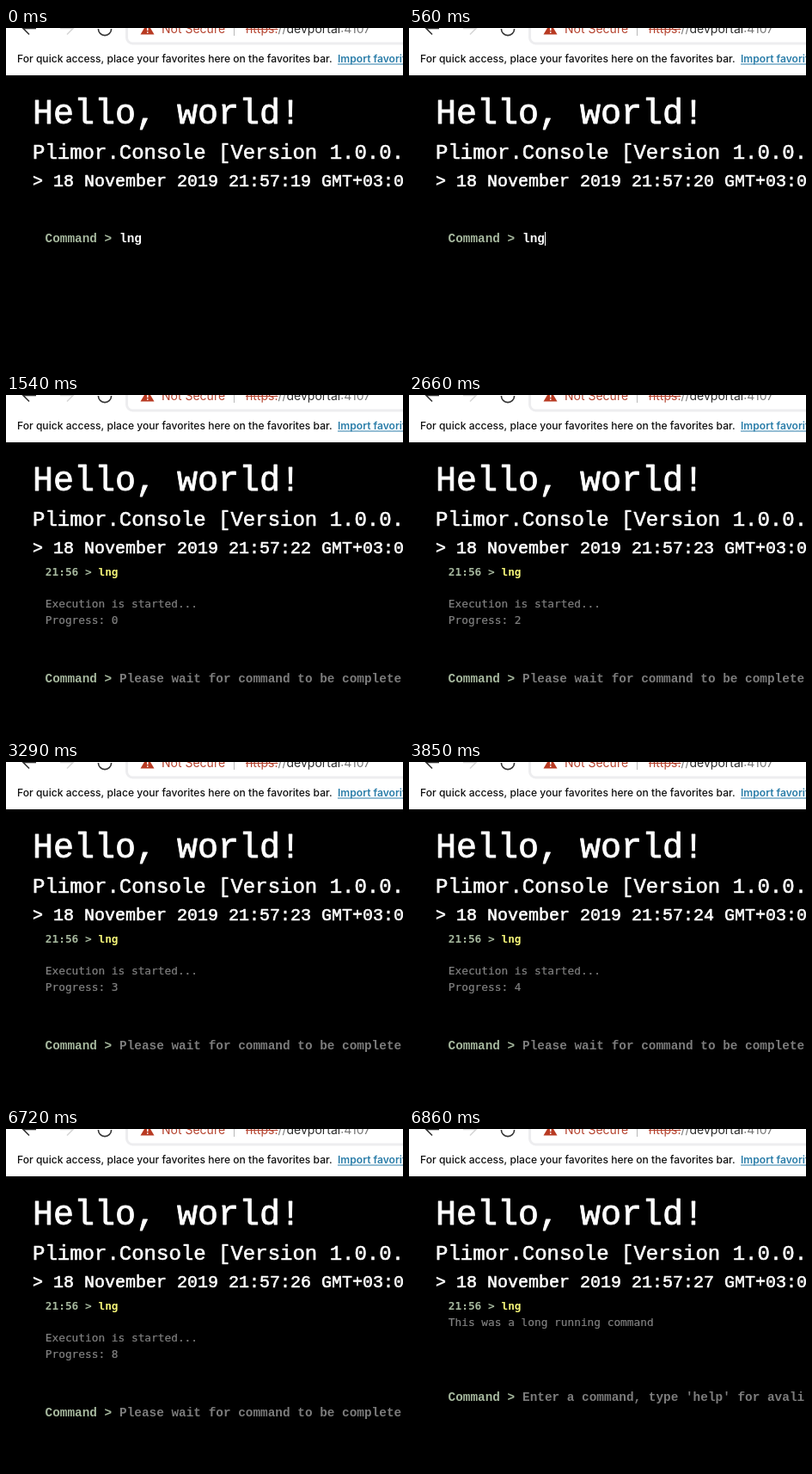
These frames come from a looping animation (462x394 px, 8120 ms). An HTML page with a canvas:

```html
<!DOCTYPE html>
<html lang="en">
<head>
<meta charset="utf-8">
<title>Console</title>
<style>
  html, body { margin: 0; width: 100%; height: 100%; overflow: hidden; background: #000; }
  canvas { display: block; }
</style>
</head>
<body>
<canvas id="stage" width="462" height="394"></canvas>
<script>
const ctx = document.getElementById('stage').getContext('2d');
const LOOP = 8120;

const UI = 'Inter, sans-serif';
const COURIER = '"Liberation Mono", monospace';
const MENLO = '"DejaVu Sans Mono", monospace';
const PROMPT_FONT = `bold 14.4px ${COURIER}`;
const LOG_FONT = `12.8px ${MENLO}`;

const GREEN = '#a6b89e';
const GRAY = '#7c7c7c';
const RED = '#b5432f';
const BLUE = '#2a7da9';

// Times at which each counter goes up by one
const CLOCK_TICKS = [140, 980, 1470, 2660, 3780, 5040, 5600, 6790];
const PROGRESS_TICKS = [2170, 2660, 3290, 3780, 4480, 5040, 5600, 6230, 6790];
const CARET_ON = 490, STARTED = 980, PROGRESS = 1540, DONE = 6860;

const count = (ticks, t) => ticks.filter(tick => t >= tick).length;

// Draws text, thickened by an outline if given, and returns the x where it ends
function text(string, x, y, font, color, outline = 0) {
  ctx.font = font;
  ctx.fillStyle = ctx.strokeStyle = color;
  ctx.fillText(string, x, y);
  if (outline) {
    ctx.lineWidth = outline;
    ctx.lineJoin = 'round';
    ctx.strokeText(string, x, y);
  }
  return x + ctx.measureText(string).width;
}

function line(points, color, width) {
  ctx.beginPath();
  points.forEach(([x, y]) => ctx.lineTo(x, y));
  ctx.strokeStyle = color;
  ctx.lineWidth = width;
  ctx.lineJoin = 'miter';
  ctx.stroke();
}

function drawAddressBar() {
  ctx.beginPath();
  ctx.roundRect(140.5, -16, 360, 34, 7);
  ctx.strokeStyle = '#ededef';
  ctx.lineWidth = 3;
  ctx.stroke();

  ctx.beginPath();
  ctx.moveTo(164.5, -6);
  ctx.lineTo(172.5, 7.5);
  ctx.lineTo(156.5, 7.5);
  ctx.fillStyle = '#b83a22';
  ctx.fill();
  ctx.fillStyle = '#fff';
  ctx.fillRect(164, -1, 1.5, 4);
  ctx.fillRect(164, 4.2, 1.5, 1.6);

  const font = `14px ${UI}`;
  text('Not Secure', 181, 6, font, RED);
  line([[265.5, 0], [265.5, 9]], '#b8b8b8', 1);
  const schemeEnd = text('https:', 279, 6, font, RED);
  line([[279, 1.5], [schemeEnd, 1.5]], RED, 1.2);
  const slashEnd = text('//', schemeEnd, 6, font, '#777');
  const hostEnd = text('devportal', slashEnd, 6, font, '#2b2b2b');
  text(':4107', hostEnd, 6, font, '#777');
}

function drawBrowser() {
  ctx.fillStyle = '#fff';
  ctx.fillRect(0, 0, 462, 55);

  line([[35, 0.5], [20, 0.5], [27, 7.5]], '#333', 1.6);
  line([[63, 0.5], [78, 0.5], [71, 7.5]], '#d6d6d6', 1.6);
  ctx.beginPath();
  ctx.arc(115, 1, 7.6, 0, Math.PI);
  ctx.strokeStyle = '#333';
  ctx.lineWidth = 1.6;
  ctx.stroke();

  drawAddressBar();

  text('For quick access, place your favorites here on the favorites bar.',
    13, 40, `500 12.1px ${UI}`, '#111');
  text('Import favorites', 386, 40, `600 12.1px ${UI}`, BLUE);
  line([[386, 42], [462, 42]], BLUE, 1);
}

function drawHeader(t) {
  const seconds = 19 + count(CLOCK_TICKS, t);
  text('Hello, world!', 31, 111, `40px ${COURIER}`, '#fff', 0.8);
  text('Plimor.Console [Version 1.0.0.0]', 31, 152, `24px ${COURIER}`, '#fff', 0.6);
  text(`> 18 November 2019 21:57:${seconds} GMT+03:00`, 31, 183.5, `20px ${COURIER}`, '#fff', 0.6);
}

function drawPrompt(y, input, color) {
  text('Command >', 45.5, y, PROMPT_FONT, GREEN);
  text(input, 132, y, PROMPT_FONT, color);
}

function drawLog(t) {
  const log = (string, y) => text(string, 45.8, y, LOG_FONT, '#808080', 0.2);
  const end = text('21:56 > ', 45.8, 210, `bold ${LOG_FONT}`, GREEN);
  text('lng', end, 210, `bold ${LOG_FONT}`, '#f4f478');

  if (t >= DONE) {
    log('This was a long running command', 229);
    drawPrompt(316, "Enter a command, type 'help' for avali", GRAY);
    return;
  }
  log('Execution is started...', 247);
  const running = t >= PROGRESS;
  if (running) log(`Progress: ${count(PROGRESS_TICKS, t)}`, 266);
  drawPrompt(running ? 334 : 315, 'Please wait for command to be complete', GRAY);
}

function draw(t) {
  ctx.fillStyle = '#000';
  ctx.fillRect(0, 0, 462, 394);
  drawBrowser();
  drawHeader(t);
  if (t >= STARTED) {
    drawLog(t);
  } else {
    drawPrompt(249, 'lng', '#fff');
    if (t >= CARET_ON) ctx.fillRect(158, 237, 1, 16);
  }
}

const start = performance.now();
function frame() {
  draw((performance.now() - start) % LOOP);
  requestAnimationFrame(frame);
}
frame();
</script>
</body>
</html>
```
